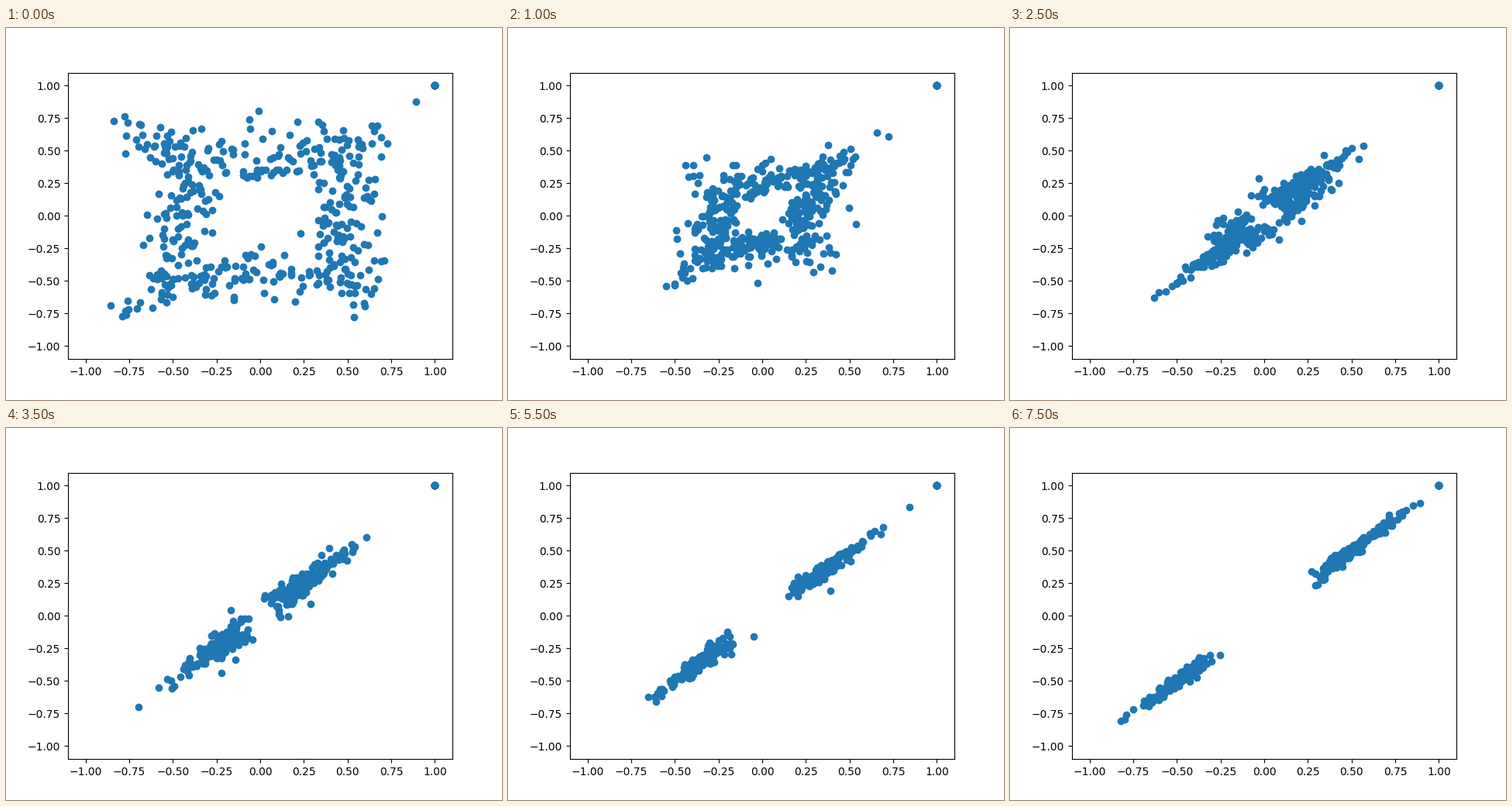
A matplotlib script for the animation above (8000 ms loop, 640x480 px).

```python
import numpy as np
import matplotlib.pyplot as plt
from matplotlib.animation import FuncAnimation

STEPS, STEP_MS = 16, 500
COUNT, CORNER = 450, 25


def cloud(step):
    """Star-shaped ring that flattens along the diagonal, then splits in two."""
    rng = np.random.default_rng(40 + step)
    n = 2 * COUNT
    decay = np.exp(-0.27 * step)
    size = 0.47 * decay + 0.028 * step     # shrinks, then grows again
    flat = 0.2 + 0.72 * decay              # width relative to length
    hole = 0.2 + 0.031 * step              # inner radius relative to size
    peak = 3 + 8 * np.exp(-0.5 * step)     # low values give longer tails
    pull = 0.75 + 0.06 * step ** 2         # crowding towards the diagonal

    f = rng.beta(pull, 0.8, n)
    r = size * (hole + (1 - hole) * rng.gamma(peak, 1 / peak, n))
    r *= 1 + 0.25 * (2 * f - 1) ** 2       # stretch the tips of the star
    along = r * f * rng.choice([-1, 1], n)
    across = r * (1 - f) * flat * rng.choice([-1, 1], n)
    across += rng.normal(0, 0.009, n)

    xy = np.column_stack([along + across, along - across])
    xy = xy[abs(xy).max(axis=1) < 0.93][:COUNT]
    return np.vstack([xy, np.ones((CORNER, 2))])


fig, ax = plt.subplots(figsize=(6.4, 4.8), dpi=100)
ax.set_xlim(-1.1, 1.1)
ax.set_ylim(-1.1, 1.1)
dots = ax.scatter([], [], color="C0")


def update(step):
    dots.set_offsets(cloud(step))
    return (dots,)


anim = FuncAnimation(fig, update, frames=STEPS, interval=STEP_MS,
                     repeat=True, repeat_delay=0)
plt.show()
```
